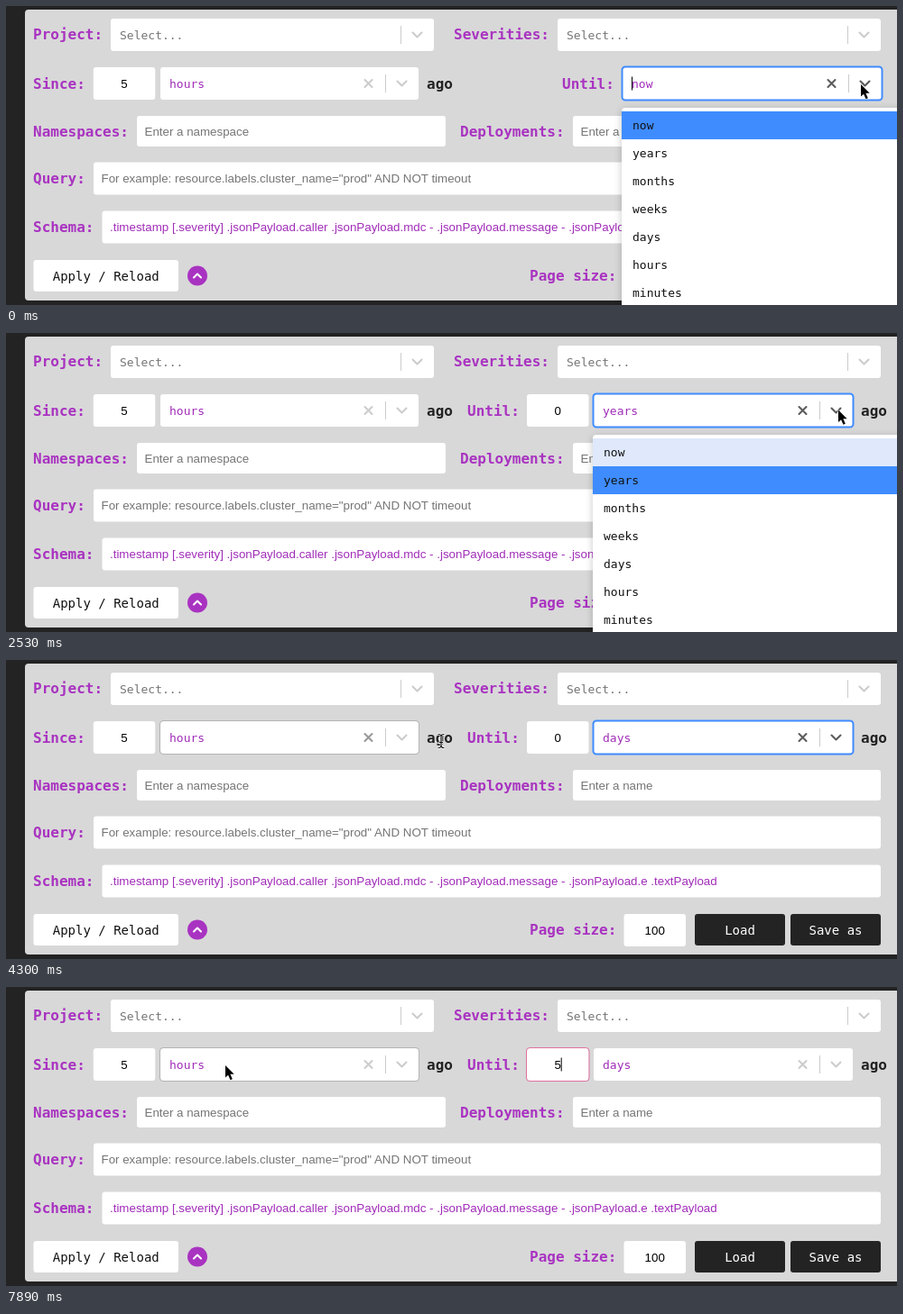
These frames come from a looping animation (987x332 px, 8 s). An HTML page:

```html
<!DOCTYPE html>
<html lang="en">
<head>
<meta charset="utf-8">
<title>Log filter form</title>
<style>
  html, body { margin: 0; width: 100%; height: 100%; overflow: hidden; background: #232323; }
  svg { display: block; width: 987px; height: 332px; }
  text { white-space: pre; }
  .label, .ago { font: bold 16px "DejaVu Sans Mono", monospace; }
  .label { fill: #a933c1; }
  .ago { fill: #222; }
  .mono { font: 13px "DejaVu Sans Mono", monospace; fill: #111; }
  .button { font: 14px "DejaVu Sans Mono", monospace; fill: #111; }
  .sans { font: 13.333px "Liberation Sans", Arial, sans-serif; fill: #000; }
  .hint { fill: #757575; }
  .value { fill: #a02cb8; }
  .white { fill: #fff; }
  .icon { fill: none; stroke: #ccc; stroke-width: 2.1; stroke-linecap: round; stroke-linejoin: round; }
  .focused .icon { stroke: #5c5c5c; }
  .frame { fill: none; stroke: none; }
  .hover .frame { stroke: #b3b3b3; }
  .focused .frame { stroke: #3f8cff; stroke-width: 2; }
  .leaving .clear { stroke: #999; }
  #amount.focused .frame { stroke: #e0709f; stroke-width: 1; }
  #menu { filter: drop-shadow(0 2px 4px rgba(0, 0, 0, .22)); }
</style>
</head>
<body>
<svg id="stage" viewBox="0 0 987 332" xmlns="http://www.w3.org/2000/svg"></svg>
<script>
const LOOP = 8000;
const UNITS = ['now', 'years', 'months', 'weeks', 'days', 'hours', 'minutes'];
const ROW = 31, MENU_TOP = 117;

const box = (x, y, w, h, fill = '#fff', r = 3) =>
  `<rect x="${x}" y="${y}" width="${w}" height="${h}" rx="${r}" fill="${fill}"/>`;
const text = (cls, x, y, s, extra = '') =>
  `<text class="${cls}" x="${x}" y="${y}" ${extra}>${s}</text>`;
const middle = 'text-anchor="middle"';
const frame = (x, y, w, h) =>
  `<rect class="frame" x="${x - .5}" y="${y - .5}" width="${w + 1}" height="${h + 1}" rx="3.5"/>`;
const chevron = (x, y) => `<path class="icon" d="M${x - 5} ${y - 2.5}l5 5 5-5"/>`;
const cross = (x, y) =>
  `<path class="icon clear" d="M${x - 4} ${y - 4}l8 8m0-8l-8 8"/>`;

function select(x, y, w, value, clearable) {
  const mid = y + 18;
  return box(x, y, w, 36) + frame(x, y, w, 36) +
    text(clearable ? 'mono value' : 'mono hint', x + 10, mid + 4.5, value) +
    (clearable ? cross(x + w - 55.5, mid) : '') +
    box(x + w - 37, mid - 10, 1, 20, '#ccc', 0) + chevron(x + w - 18.5, mid);
}

const input = (x, y, w, h, value, cls) =>
  box(x, y, w, h) + text('sans ' + cls, x + 8.5, y + h / 2 + 4.5, value);
const number = (x, y, value) =>
  box(x, y, 68.5, 36) + text('sans', x + 34.2, y + 23, value, middle);
const button = (x, w, label, fill, cls) =>
  box(x, 282, w, 35, fill) + text('button ' + cls, x + w / 2, 304.5, label, middle);

document.getElementById('stage').innerHTML = `
  ${box(0, 0, 987, 332, '#232323', 0)}
  ${box(21, 4, 980, 323, '#d8d8d8', 4)}
  ${text('label', 30, 37, 'Project:')}${select(116, 14, 358, 'Select...')}
  ${text('label', 496, 37, 'Severities:')}${select(611, 14, 358, 'Select...')}
  ${text('label', 30, 91.5, 'Since:')}${number(96.8, 68, 5)}
  <g id="since">${select(171, 68, 286, 'hours', true)}</g>
  ${text('ago', 466, 91.5, 'ago')}
  ${text('label', 30, 144.5, 'Namespaces:')}
  ${input(145, 122, 342, 34, 'Enter a namespace', 'hint')}
  ${text('label', 503, 144.5, 'Deployments:')}
  ${input(628, 122, 341, 34, 'Enter a name', 'hint')}
  ${text('label', 30, 197, 'Query:')}
  ${input(97, 173.5, 872, 36, 'For example: resource.labels.cluster_name="prod" AND NOT timeout', 'hint')}
  ${text('label', 30, 251, 'Schema:')}
  ${input(106.5, 227.5, 862.5, 36, '.timestamp [.severity] .jsonPayload.caller .jsonPayload.mdc - .jsonPayload.message - .jsonPayload.e .textPayload', 'value')}
  ${button(30.5, 160.5, 'Apply / Reload', '#fff', '')}
  <circle cx="212" cy="299.5" r="11" fill="#a933c1"/>
  <path class="icon" style="stroke:#fff" d="M208 301.5l4-4 4 4"/>
  ${text('label', 580, 305, 'Page size:')}${number(684.5, 282, 100)}
  ${button(763, 100, 'Load', '#232323', 'white')}
  ${button(869, 100, 'Save as', '#232323', 'white')}
  <text id="untilLabel" class="label" y="91.5">Until:</text>
  <g id="amount">${number(577, 68, 0)}${frame(577, 68, 68.5, 36)}</g>
  <g id="until">${select(0, 68, 287, 'now', true)}</g>
  ${text('ago', 947, 91.5, 'ago', 'id="untilAgo"')}
  <rect id="caret" width="1" height="15" y="78.5"/>
  <g id="menu">
    ${box(0, 113, 420, 260, '#fff', 4)}
    ${UNITS.map((u, i) =>
      `<rect class="row" y="${MENU_TOP + i * ROW}" width="420" height="${ROW}"/>` +
      text('mono', 12, MENU_TOP + 20 + i * ROW, u)).join('')}
  </g>
  <g id="cursor">
    <path id="arrow" d="M0 0v13.6l3.1-2.9 2.4 5.5 2.3-1-2.4-5.4h4.3z" fill="#000" stroke="#fff" stroke-width="1" paint-order="stroke"/>
    <g id="beam" fill="none" stroke-linecap="round">
      ${['#fff', '#111'].map((c, i) =>
        `<path d="M-3-7.5q3 0 3 2.5q0-2.5 3-2.5M0-5V5M-3 7.5q3 0 3-2.5q0 2.5 3 2.5M-1.5 1.5h3" stroke="${c}" stroke-width="${i ? 1.2 : 2.6}"/>`).join('')}
    </g>
  </g>`;

const $ = id => document.getElementById(id);
const rows = [...document.querySelectorAll('.row')];
const unitText = $('until').querySelector('text');
const amountText = $('amount').querySelector('text');
const show = (el, on) => { el.style.display = on ? '' : 'none'; };
const within = (t, a, b) => t >= a && t < b;

// Pointer trips in discrete steps along a quadratic curve.
const trips = [
  { start: 140, end: 740, steps: 5, from: [947, 87], via: [850, 130], to: [787, 164] },
  { start: 1330, end: 1930, steps: 5, from: [787, 164], via: [930, 34], to: [922, 85.5] },
  { start: 2680, end: 3420, steps: 6, from: [922, 85.5], via: [800, 190], to: [778, 253] },
  { start: 3710, end: 4300, steps: 5, from: [778, 253], via: [300, 5], to: [482, 90] },
  { start: 4450, end: 4750, steps: 3, from: [482, 90], via: [580, 95], to: [613, 95.5] },
  { start: 6400, end: 6400, steps: 1, from: [613, 95.5], via: [613, 95.5], to: [622, 83] },
  { start: 6540, end: 6540, steps: 1, from: [622, 83], via: [622, 83], to: [642, 86] },
  { start: 6990, end: 7890, steps: 7, from: [642, 86], via: [400, 48], to: [243, 87] }
];

function pointer(t) {
  let at = trips[0].from;
  for (const { start, end, steps, from, via, to } of trips) {
    if (t < start) break;
    const gap = (end - start) / Math.max(1, steps - 1) || 1;
    const u = Math.min(steps, Math.floor((t - start + 6) / gap) + 1) / steps, v = 1 - u;
    at = from.map((p, i) => v * v * p + 2 * u * v * via[i] + u * u * to[i]);
  }
  return at;
}

function render(t) {
  const [x, y] = pointer(t);
  const relative = t >= 890;
  const left = relative ? 651 : 683;
  const unit = t < 890 ? 0 : t < 3560 ? 1 : 4;

  $('untilLabel').setAttribute('x', relative ? 511 : 616);
  show($('amount'), relative);
  show($('untilAgo'), relative);
  $('until').setAttribute('transform', `translate(${left})`);
  $('until').classList.toggle('focused', t < 4900);
  unitText.textContent = UNITS[unit];

  const amount = t < 5800 ? '0' : t < 5950 ? '05' : '5';
  amountText.textContent = amount;
  $('amount').classList.toggle('focused', t >= 4900);

  show($('caret'), t < 440 || within(t, 5050, 6400) || t >= 6540);
  $('caret').setAttribute('x', relative ? 611 + amount.length * 3.7 : 693);

  const overSince = x > 170 && x < 458 && y > 67 && y < 105;
  const leaving = within(t, 4300, 4450);
  $('since').classList.toggle('hover', overSince || leaving);
  $('since').classList.toggle('leaving', leaving);

  show($('menu'), t < 890 || within(t, 2530, 3560));
  $('menu').setAttribute('transform', `translate(${left - 1})`);
  const hot = Math.max(0, Math.floor((y - MENU_TOP) / ROW));
  const pressed = within(t, 740, 890) || within(t, 3420, 3560);
  rows.forEach((row, i) => row.setAttribute('fill',
    i === hot && pressed ? '#b8d6ff' : i === unit ? '#3f8cff' : i === hot ? '#dfe9fb' : '#fff'));

  const beam = within(t, 3560, 3710) || leaving || within(t, 4600, 5800);
  show($('cursor'), !within(t, 5800, 6400));
  show($('beam'), beam);
  show($('arrow'), !beam);
  $('cursor').setAttribute('transform', `translate(${x} ${y})`);
}

const began = performance.now();
function tick() {
  render((performance.now() - began) % LOOP);
  requestAnimationFrame(tick);
}
tick();
</script>
</body>
</html>
```
